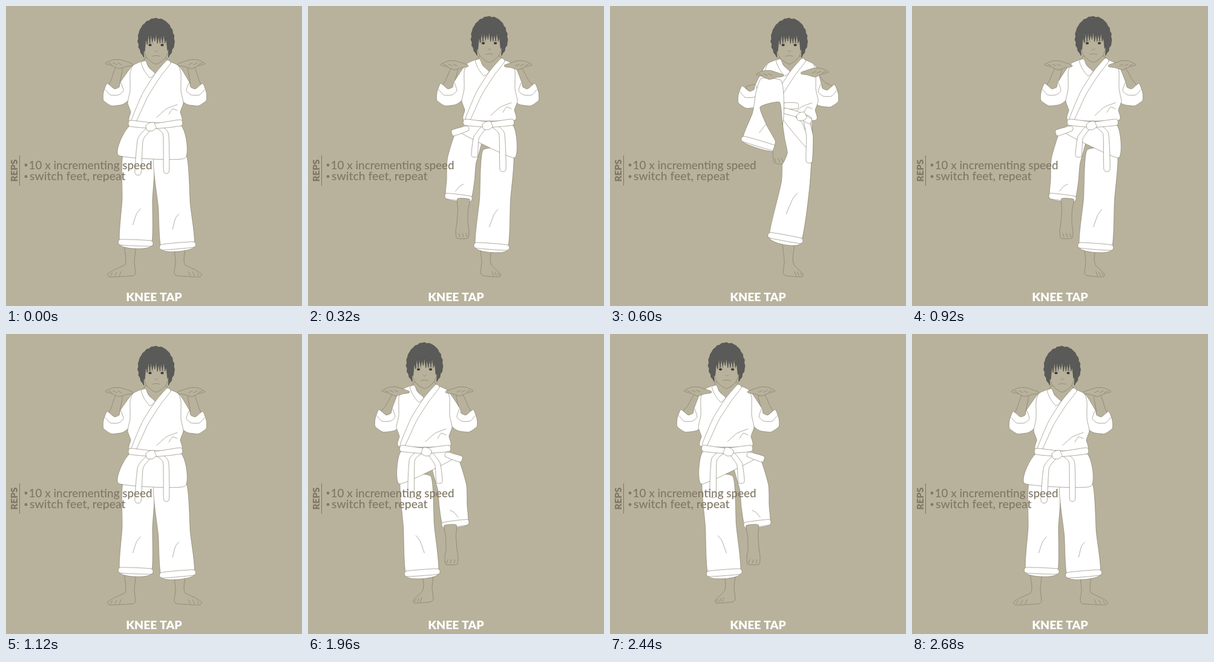
An HTML page with a canvas for the animation above (3.2 s loop, 489 px wide and 496 px high).

```html
<!DOCTYPE html>
<html lang="en">
<head>
<meta charset="utf-8">
<title>Knee tap</title>
<style>
html, body { margin: 0; width: 100%; height: 100%; overflow: hidden; background: #b8b29c; }
canvas { display: block; width: 489px; height: 496px; }
</style>
</head>
<body>
<canvas id="stage" width="489" height="496"></canvas>
<script>
const ctx = document.getElementById('stage').getContext('2d');
const SKIN = '#b8b29c', CLOTH = '#fff', HAIR = '#5a5a59', INK = '#807765', LINE = '#79725f';
const LOOP = 3200;

// Joints of each pose. Limb nodes are [x, y, width]; an arm is [elbow x, y, hand x, y].
const stand = {
  head: [248, 20], chest: [247, 90], lean: 0,
  arms: [[181, 152, 187, 96], [311, 152, 306, 96]],
  legs: [[[219, 245, 50], [217, 320, 50], [214, 396, 51]], [[271, 248, 53], [278, 330, 53], [284, 401, 53]]],
  feet: [[205, -37], [287, 36]],
  skirt: [[205, 198], [186, 247], [295, 252], [289, 198]],
  waist: [[205, 194, 10], [248, 198, 9], [289, 193, 10]], knot: [239, 200],
  tails: [[[236, 203, 7], [222, 221, 9], [218, 276, 10]], [[251, 199, 7], [264, 212, 9], [265, 273, 9]]]
};
const step = {
  head: [299.5, 17], chest: [300, 87], lean: 0, high: 0,
  arms: [[233, 152, 242, 98], [361, 152, 347, 98]],
  legs: [[[314, 240, 50], [309, 320, 51], [303, 402, 52]]],
  feet: [[294, 24]],
  thigh: [[268, 208, 42], [254, 256, 48], [252, 288, 46], [248, 321, 39]],
  shin: [[257, 319, 20], [256, 337, 17], [255, 358, 18], [255, 372, 22], [255, 384, 18]],
  skirt: [[260, 197], [253, 210], [341, 251], [338, 197]],
  waist: [[259, 192, 10], [300, 196, 9], [338, 192, 10]], knot: [296, 198],
  flap: [[264, 202, 8], [239, 210, 10]],
  tails: [[[291, 200, 7], [278, 218, 9], [275, 248, 10]], [[304, 196, 7], [320, 211, 9], [322, 270, 10]]]
};
const tap = {
  head: [296, 20], chest: [298, 87], lean: 0, high: 1,
  arms: [[232, 156, 264, 114], [357, 154, 338, 110]],
  legs: [[[310, 185, 46], [307, 290, 47], [289, 388, 52]]],
  feet: [[295, 24]],
  thigh: [[266, 121, 32], [264, 145, 46], [261, 182, 52], [246, 232, 56]],
  shin: [[264, 163, 33], [272, 195, 26], [281, 222, 16], [281, 242, 24], [278, 260, 14]],
  skirt: [[286, 172], [286, 188], [331, 240], [331, 190]],
  waist: [[288, 173, 9], [312, 180, 9], [331, 191, 9]], knot: [316, 183],
  flap: [[288, 165, 10], [310, 165, 9]],
  tails: [[[308, 181, 6], [320, 190, 7], [326, 204, 8]], [[324, 188, 8], [330, 215, 11], [329, 257, 10]]]
};

function mix(a, b, k) {
  if (typeof a === 'number') return a + (b - a) * k;
  if (Array.isArray(a)) return a.map((v, i) => mix(v, b[i], k));
  return Object.fromEntries(Object.keys(a).map(key => [key, mix(a[key], b[key], k)]));
}
const lift = { ...mix(step, tap, 0.4), lean: 8 };

// Start time, pose, other leg?
const beats = [
  [0, stand], [320, step], [480, lift], [600, tap], [760, lift], [920, step], [1120, stand],
  [1960, step, true], [2200, tap, true], [2440, step, true], [2680, stand]
];

// Gentle curve through the points; without a fill it stays open
function shape(fill, pts, line = LINE) {
  const n = pts.length, soft = 0.09;
  const at = i => fill ? pts[(i + n) % n] : pts[Math.max(0, Math.min(n - 1, i))];
  ctx.beginPath();
  ctx.moveTo(...pts[0]);
  for (let i = 0; i < (fill ? n : n - 1); i++) {
    const [a, b, c, d] = [-1, 0, 1, 2].map(j => at(i + j));
    ctx.bezierCurveTo(b[0] + (c[0] - a[0]) * soft, b[1] + (c[1] - a[1]) * soft,
      c[0] - (d[0] - b[0]) * soft, c[1] - (d[1] - b[1]) * soft, ...c);
  }
  if (fill) { ctx.fillStyle = fill; ctx.fill(); }
  ctx.strokeStyle = line;
  ctx.lineWidth = 0.6;
  ctx.stroke();
}

// Limb along [x, y, width] nodes
function tube(fill, nodes) {
  const left = [], right = [];
  nodes.forEach(([x, y, w], i) => {
    const a = nodes[Math.max(0, i - 1)], b = nodes[Math.min(nodes.length - 1, i + 1)];
    const dx = b[0] - a[0], dy = b[1] - a[1], r = w / 2 / Math.hypot(dx, dy);
    left.push([x + dy * r, y - dx * r]);
    right.unshift([x - dy * r, y + dx * r]);
  });
  shape(fill, [...left, ...right]);
}

// Closed outline from [half width, y] rows
function sym(fill, x, y, rows) {
  const side = s => rows.map(([w, h]) => [x + s * w, y + h]);
  shape(fill, [...side(1), ...side(-1).reverse()]);
}

function seeded(seed) {
  return () => (seed = seed * 16807 % 2147483647) / 2147483647;
}

function head([x, y]) {
  const rnd = seeded(41);
  sym(SKIN, x, y, [[21, 34], [20, 55], [15, 66], [7, 73], [1, 76]]);
  for (const s of [-1, 1]) {
    ctx.fillStyle = '#3c3935';
    ctx.beginPath();
    ctx.ellipse(x + s * 10, y + 44.5, 2.6, 1.9, 0, 0, 7);
    ctx.fill();
    shape(null, [[x + s * 5, y + 42], [x + s * 10, y + 40], [x + s * 15, y + 42]]);
  }
  shape(null, [[x - 2, y + 54], [x, y + 55.5], [x + 3, y + 54]]);
  shape(null, [[x - 6, y + 63], [x, y + 62], [x + 6, y + 63]]);

  const hair = [];
  for (let i = 0; i <= 36; i++) {
    const a = Math.PI * (0.73 + 1.54 * i / 36), r = 1 - (i % 2) * 0.05 * rnd();
    hair.push([x + 30.5 * r * Math.cos(a), y + 37 + 37 * r * Math.sin(a)]);
  }
  for (let i = 0; i <= 20; i++) {
    const u = 1 - i / 10;
    hair.push([x + 21 * u, y + (i % 2 ? 40 : 27) + 24 * u ** 6 + 5 * (rnd() - 0.5)]);
  }
  shape(HAIR, hair, '#444340');
}

function torso([x, y]) {
  sym(CLOTH, x, y, [[17, 0], [37, 8], [42, 22], [42, 50], [46, 70], [41, 85], [41, 102]]);
}

function collar([x, y]) {
  shape(SKIN, [[x - 17, y - 4], [x - 17, y + 3], [x, y + 21], [x + 18, y + 2], [x + 17, y - 4]]);
  tube(CLOTH, [[x - 20, y + 2, 8], [x - 15, y + 14, 9], [x - 5, y + 25, 11]]);
  tube(CLOTH, [[x + 22, y + 2, 8], [x + 4, y + 24, 10], [x - 17, y + 57, 10], [x - 36, y + 100, 8]]);
  for (const k of [0, 1])
    shape(null, [[x + 2 + 20 * k, y + 94 - 5 * k], [x + 18 + 10 * k, y + 80], [x + 36, y + 73 + 10 * k]]);
}

// s is -1 for the left of the picture, 1 for the right
function arm([ex, ey, hx, hy], s, [x, y]) {
  const p = (dx, dy) => [ex + s * dx, ey + dy];
  tube(SKIN, [[...p(3, -14), 19], [(ex + hx) / 2 + s * 3, (ey + hy) / 2, 15], [hx, hy + 6, 11]]);
  shape(CLOTH, [[x + s * 35, y + 7], [x + s * 44, y + 16], p(-8, -26), p(-6, -18), p(2, -15),
    p(14, -24), p(20, -9), p(20, 4), p(7, 13), p(-11, 11), p(-22, 3), [x + s * 36, y + 45]]);
  shape(null, [p(17, -14), p(9, -5), p(-5, -5), p(-13, -12), p(-9, -25)]);
}

function hand([, , x, y], s) {
  tube(SKIN, [[22, -1, 2], [11, -2, 10], [0, 0, 15], [-12, 0, 8], [-22, 1, 3]]
    .map(([dx, dy, w]) => [x + s * dx, y + dy, w]));
  for (let i = 0; i < 3; i++)
    shape(null, [[x + s * (18 - 8 * i), y - 2], [x + s * (12 - 8 * i), y + 1]]);
}

function foot([x, reach]) {
  const d = Math.sign(reach), y = 446;
  shape(SKIN, [[x - d * 10, y - 62], [x - d * 7, y - 24], [x - d * 9, y - 5], [x - d * 4, y],
    [x + reach * 0.9, y + 2], [x + reach, y - 3], [x + reach * 0.7, y - 10],
    [x + d * 9, y - 18], [x + d * 7, y - 28], [x + d * 10, y - 62]]);
  for (let i = 0; i < 3; i++) {
    const tx = x + reach * (0.4 + i * 0.2);
    shape(null, [[tx, y - 7 + i], [tx + d * 3, y]]);
  }
}

function trouser(nodes) {
  const [a, b] = nodes.slice(-2), len = Math.hypot(b[0] - a[0], b[1] - a[1]);
  tube(CLOTH, nodes);
  tube(CLOTH, [mix(b, a, 9 / len), b]);
  shape(null, [mix(a, b, 0.2), mix(a, b, 0.3), mix(a, b, 0.55)].map(([x, y], i) => [x + 6 - i * 6, y]));
}

function raised({ thigh, shin }) {
  trouser(thigh);
  tube(SKIN, shin);
  const [x, y] = shin[4];
  for (const dx of [-6, 0, 6]) shape(null, [[x + dx, y - 8], [x + dx + 2, y - 2]]);
}

function belt({ waist, knot: [x, y], tails, flap }) {
  if (flap) tube(CLOTH, flap);
  tails.forEach(t => tube(CLOTH, t));
  tube(CLOTH, waist);
  tube(CLOTH, [[x - 7, y + 2, 8], [x, y, 14], [x + 7, y - 3, 10]]);
}

function within(setup, draw) {
  ctx.save();
  setup();
  draw();
  ctx.restore();
}

function figure(pose, flip) {
  const { chest, arms, lean, high } = pose;
  const upper = draw => within(() => ctx.translate(lean, 0), draw);
  // Head and jacket overlap keep their side when the rest is mirrored
  const upright = (x, draw) => upper(() => within(() => {
    if (flip) { ctx.translate(2 * x, 0); ctx.scale(-1, 1); }
  }, draw));

  within(() => {
    if (flip) { ctx.translate(492, -3); ctx.scale(-1, 1); }
  }, () => {
    upper(() => {
      arms.forEach((a, i) => arm(a, i * 2 - 1, chest));
      torso(chest);
    });
    upright(chest[0], () => collar(chest));
    pose.feet.forEach(foot);
    pose.legs.forEach(trouser);
    if (pose.thigh && high < 0.5) raised(pose);
    shape(CLOTH, pose.skirt);
    belt(pose);
    if (high >= 0.5) raised(pose);
    upright(pose.head[0], () => head(pose.head));
    upper(() => arms.forEach((a, i) => hand(a, i * 2 - 1)));
  });
}

function label(text, x, y, size, weight, color) {
  ctx.font = `${weight} ${size}px Lato, sans-serif`;
  ctx.fillStyle = color;
  ctx.fillText(text, x, y);
}

function captions() {
  ctx.textAlign = 'left';
  label('10 x incrementing speed', 37.5, 270, 18.9, 500, INK);
  label('switch feet, repeat', 39, 288, 19.4, 500, INK);
  for (const y of [263, 282]) {
    ctx.beginPath();
    ctx.arc(33, y, 2.4, 0, 7);
    ctx.fill();
  }
  ctx.fillRect(22, 247, 1, 50);
  ctx.textAlign = 'center';
  within(() => {
    ctx.translate(18.5, 272);
    ctx.rotate(-Math.PI / 2);
  }, () => label('REPS', 0, 0, 15.3, 900, INK));
  label('KNEE TAP', 244.5, 488, 19.5, 900, '#fff');
}

const start = performance.now();
function draw() {
  const t = Math.max(0, performance.now() - start) % LOOP;
  const [, pose, flip] = beats.filter(b => b[0] <= t).pop();
  ctx.fillStyle = SKIN;
  ctx.fillRect(0, 0, 489, 496);
  ctx.lineJoin = ctx.lineCap = 'round';
  figure(pose, flip);
  captions();
  requestAnimationFrame(draw);
}
draw();
</script>
</body>
</html>
```
